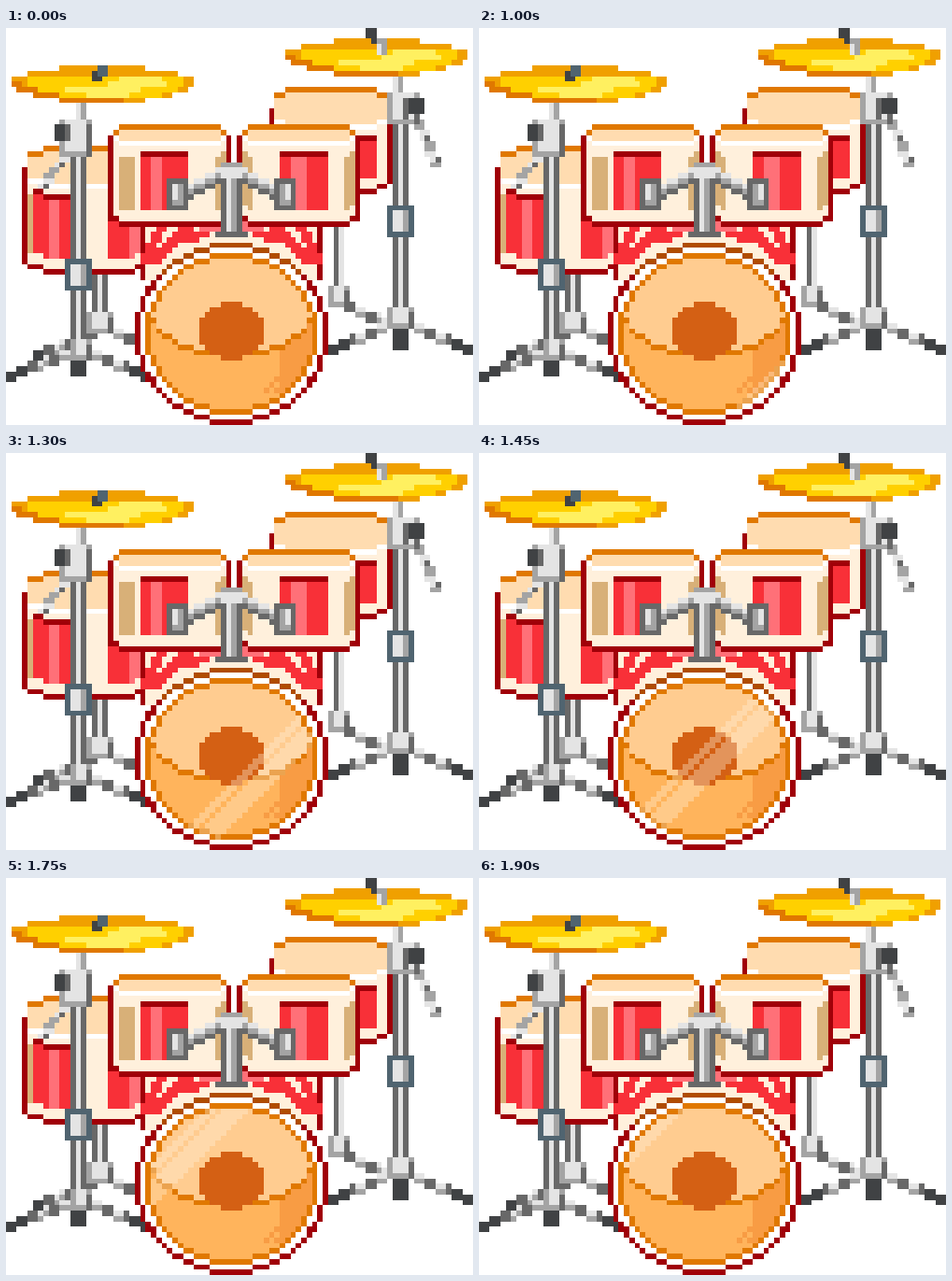
An HTML page with a canvas that plays this animation: 500x425 px, repeating every 2.05 s.

```html
<!DOCTYPE html>
<html lang="en">
<head>
<meta charset="utf-8">
<title>Drum kit</title>
<style>
html, body { margin: 0; width: 100%; height: 100%; overflow: hidden; background: #fff; }
canvas { display: block; width: 500px; height: 425px; image-rendering: pixelated; }
</style>
</head>
<body>
<canvas id="stage" width="87" height="74"></canvas>
<script>
const W = 87, H = 74;
const C = {
  wine: '#a00008', red: '#f83038', pink: '#ff7078', tan: '#d8b078', cream: '#fff0dc', white: '#ffffff',
  rim: '#e07800', head: '#ffdcb0', skin: '#ffcc90', low: '#ffb45c', shade: '#f89c44', disc: '#d46014',
  brown: '#b04c00', ink: '#404244', iron: '#686868', steel: '#a4a4a4', chrome: '#e4e4e4', blue: '#506470',
  gold: '#ffd000', amber: '#f0a000', shiny: '#fff060'
};
const stage = document.getElementById('stage').getContext('2d');
const kit = document.createElement('canvas');
kit.width = W;
kit.height = H;
const g = kit.getContext('2d');

function box(color, x, y, w = 1, h = 1) {
  g.fillStyle = C[color];
  g.fillRect(x, y, w, h);
}

// Whole-cell ellipse, limited to rows from..to
function oval(color, cx, cy, rx, ry, from = 0, to = H) {
  for (let y = Math.max(from, Math.floor(cy - ry)); y < Math.min(to, cy + ry); y++) {
    const v = (y + 0.5 - cy) / ry;
    if (Math.abs(v) >= 1) continue;
    const half = rx * Math.sqrt(1 - v * v);
    const left = Math.round(cx - half);
    box(color, left, y, Math.round(cx + half) - left);
  }
}

function walk(x0, y0, x1, y1, draw) {
  const n = Math.max(Math.abs(x1 - x0), Math.abs(y1 - y0));
  for (let i = 0; i <= n; i++) {
    draw(Math.round(x0 + (x1 - x0) * i / n), Math.round(y0 + (y1 - y0) * i / n), i, n);
  }
}

// Banded tripod leg with a rubber foot
function leg(x0, y0, x1, y1, foot = 4) {
  walk(x0, y0, x1, y1, (x, y, i, n) => {
    const end = i > n - foot;
    const light = Math.floor(i / 2) % 2;
    box(end ? 'ink' : light ? 'chrome' : 'iron', x, y, 1, 2);
    if (!end && light) box('steel', x, y + 1);
  });
}

function lever(x0, y0, x1, y1) {
  walk(x0, y0, x1, y1, (x, y, i) => {
    box(i % 4 < 2 ? 'steel' : 'chrome', x, y, 2);
    if (i % 4 === 3) box('iron', x + 1, y);
  });
}

function pole(x, y, h, w = 3) {
  box('iron', x, y, w, h);
  box('chrome', x + 1, y, 1, h);
  if (w > 3) box('steel', x + 2, y, w - 3, h);
}

function hub(x, y, w, h) {
  box('steel', x, y, w, h);
  box('chrome', x + 1, y, w - 2, h - 1);
  box('iron', x + w - 1, y + 1, 1, h - 1);
}

function bracket(x, y) {
  box('blue', x, y, 5, 6);
  box('chrome', x + 1, y + 1, 3, 4);
  box('steel', x + 3, y + 1, 1, 4);
}

// bands: [width, colour] from left to right across the shell
function drum(x, rim, floor, bulge, bands) {
  const w = bands.reduce((sum, b) => sum + b[0], 0);
  let col = 0;
  for (const [n, color] of bands) {
    for (let i = 0; i < n; i++, col++) {
      const u = (col + 0.5 - w / 2) / (w / 2);
      const d = Math.round(bulge * Math.sqrt(1 - u ** 4));
      const cx = x + col, top = rim - d, lip = rim + d, bottom = floor + d;
      box(color, cx, rim, 1, bottom - rim);
      if (col > 0 && col < w - 1) {
        box('cream', cx, bottom - 2, 1, 2);
        box('rim', cx, top);
        box('head', cx, top + 1, 1, lip - top - 1);
        box('white', cx, lip - 1);
        box('cream', cx, lip);
        box('wine', cx, lip + 1);
        if (color !== 'red' && color !== 'pink') box('cream', cx, lip + 1);
      }
      box('wine', cx, bottom);
    }
  }
}

function cymbal(x, y) {
  const inset = [9, 3, 0, 0, 1, 4, 9];
  inset.forEach((d, i) => {
    const w = 34 - d * 2;
    box(i < 2 || i > 5 ? 'amber' : 'gold', x + d, y + i, w);
    if (i > 1 && i < 6) {
      box('amber', x + d, y + i, 3 + (i > 3));
      box('amber', x + 32 - d, y + i, 2);
    }
  });
  box('rim', x, y + 3, 2);
  box('rim', x + 1, y + 4, 4);
  box('rim', x + 4, y + 5, 5);
  box('rim', x + 9, y + 6, 12);
  box('shiny', x + 20, y + 2, 8);
  box('shiny', x + 18, y + 3, 11);
  box('shiny', x + 10, y + 4, 14);
  box('shiny', x + 14, y + 5, 8);
}

function backStands() {
  pole(16, 45, 10);
  leg(16, 56, 5, 60, 2);
  leg(18, 55, 25, 58, 0);
  hub(15, 53, 5, 4);
  pole(61, 35, 17, 2);
  leg(63, 51, 71, 54, 0);
  hub(60, 48, 4, 4);
}

function leftStand() {
  box('steel', 13, 14, 2, 4);
  box('chrome', 13, 14, 1, 3);
  lever(11, 22, 6, 29);
  pole(12, 23, 37);
  hub(10, 17, 6, 7);
  box('ink', 9, 18, 2, 3);
  box('iron', 11, 18, 1, 3);
  bracket(11, 43);
  leg(13, 59, 0, 64);
  leg(14, 59, 26, 64);
  hub(12, 58, 4, 4);
  box('ink', 12, 62, 3, 3);
}

function rightStand() {
  box('steel', 72, 9, 2, 4);
  box('chrome', 72, 9, 1, 3);
  lever(76, 17, 79, 25);
  pole(72, 17, 38);
  hub(71, 12, 6, 6);
  box('ink', 74, 13, 4, 3);
  box('iron', 74, 13, 1, 4);
  bracket(71, 33);
  leg(72, 54, 60, 59);
  leg(74, 54, 86, 59);
  hub(71, 52, 5, 4);
  box('ink', 72, 56, 3, 4);
}

function bassDrum() {
  box('wine', 25, 35, 34, 12);
  box('cream', 26, 35, 32, 12);
  for (const side of [0, 1]) {
    const put = (color, x, y, w) => box(color, side ? 84 - x - w : x, y, w);
    for (let i = 0; i < 8; i++) {
      put('red', 33 - i, 36 + i, 3);
      put('red', 28 - (i >> 1), 36 + i, 2);
      if (i < 4) put(i < 2 ? 'pink' : 'red', 38 - i * 2, 36 + i, 4);
    }
  }
  oval('wine', 42, 57, 18, 17, 45);
  oval('brown', 42, 57, 18, 17, 0, 46);
  oval('white', 42, 57, 17, 16);
  oval('rim', 42, 57, 16, 15);
  oval('skin', 42, 57, 15, 14);

  // Shadowed lower part, edged by a sagging line
  for (let x = 27; x < 57; x++) {
    const u = (x + 0.5 - 42) / 15;
    const y = Math.round(52 + 8.5 * Math.sqrt(1 - u * u));
    const end = Math.round(57 + 14 * Math.sqrt(1 - u * u));
    box(x > 50 ? 'shade' : 'low', x, y, 1, Math.max(0, end - y));
    box('rim', x, y);
  }
  for (let y = 59; y < 68; y++) {
    for (let x = 52 - Math.max(0, y - 62); x < 54 - Math.max(0, y - 64); x++) {
      if ((x + y) % 2) box('shade', x, y);
    }
  }
  oval('disc', 42, 56.5, 6, 5.5);
}

function mount() {
  for (const side of [0, 1]) {
    const put = (color, x, y, w, h) => box(color, side ? 84 - x - w : x, y, w, h);
    for (let i = 0; i < 8; i++) {
      const y = 30 - (i >> 1);
      put('chrome', 33 + i, y - 1, 1, 1);
      put('steel', 33 + i, y, 1, 1);
      put('iron', 33 + i, y + 1, 1, 1);
    }
    put('iron', 30, 28, 4, 6);
    put('steel', 31, 29, 2, 4);
    put('chrome', 31, 29, 1, 3);
  }
  pole(40, 26, 13, 4);
  box('iron', 39, 38, 6);
  box('steel', 40, 25, 4);
  box('chrome', 40, 26, 4, 2);
}

function drawKit() {
  g.fillStyle = '#fff';
  g.fillRect(0, 0, W, H);
  backStands();
  drum(49, 15, 26, 4, [[1, 'wine'], [15, 'cream'], [4, 'red'], [2, 'cream'], [1, 'wine']]);
  drum(3, 26, 41, 4, [[1, 'wine'], [1, 'tan'], [3, 'red'], [2, 'pink'], [3, 'red'],
    [6, 'cream'], [4, 'red'], [2, 'pink'], [2, 'red'], [1, 'wine']]);
  cymbal(1, 7);
  box('ink', 16, 8, 2, 2);
  box('blue', 17, 7, 2, 2);
  cymbal(52, 2);
  box('ink', 67, 0, 2, 2);
  box('ink', 68, 2, 1, 1);
  box('steel', 69, 2, 2, 3);
  box('chrome', 69, 3, 1, 2);
  leftStand();
  rightStand();
  bassDrum();
  drum(19, 20, 34, 2, [[1, 'wine'], [1, 'cream'], [3, 'tan'], [1, 'cream'], [2, 'red'], [2, 'pink'],
    [5, 'red'], [5, 'cream'], [2, 'tan'], [1, 'wine']]);
  drum(43, 20, 34, 2, [[1, 'wine'], [2, 'tan'], [5, 'cream'], [2, 'red'], [3, 'pink'],
    [4, 'red'], [3, 'cream'], [2, 'tan'], [1, 'wine']]);
  mount();
}

// Diagonal glint: a thin stripe, a gap, then a wide stripe
function glint(step) {
  const start = Math.round(118.4 - 7.6 * (step - 1));
  stage.fillStyle = 'rgba(255,240,220,0.36)';
  for (let y = 43; y < 72; y++) {
    for (let x = 27; x < 58; x++) {
      const u = (x + 0.5 - 42.3) / 15.4, v = (y + 0.5 - 57.3) / 14.6;
      const k = x + y - start;
      if (u * u + v * v < 1 && k >= 0 && k < 8 && k !== 2) stage.fillRect(x, y, 1, 1);
    }
  }
}

const HOLD = 1000, STEP = 150, LOOP = 2050;
const begin = performance.now();
let shown = -1;

function frame() {
  const t = (performance.now() - begin) % LOOP;
  const step = t < HOLD ? 0 : 1 + Math.floor((t - HOLD) / STEP);
  if (step !== shown) {
    stage.drawImage(kit, 0, 0);
    if (step) glint(step);
    shown = step;
  }
  requestAnimationFrame(frame);
}

drawKit();
frame();
</script>
</body>
</html>
```
